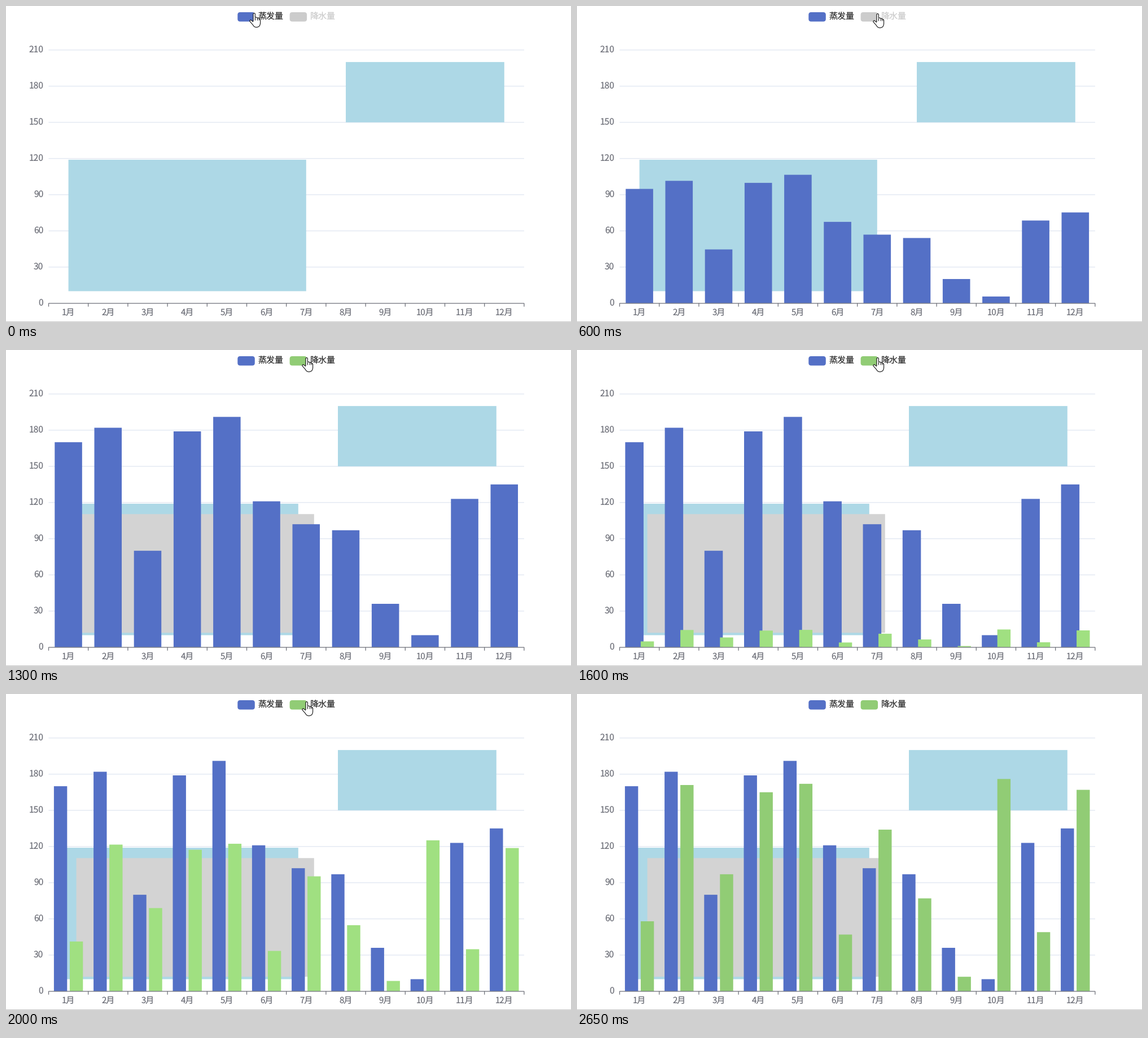
Write a matplotlib script that moves like this. It is 1001 by 559 pixels and loops after 2.94 s.

```python
import matplotlib.pyplot as plt
from matplotlib.animation import FuncAnimation
from matplotlib.patches import FancyBboxPatch, PathPatch, Rectangle
from matplotlib.path import Path
from matplotlib.transforms import Affine2D

W, H, DPI = 1001, 559, 100
LOOP, TICK = 2940, 20
PT = 72 / DPI

LEFT, BASE, BAND, UNIT = 75.5, 525.8, 70.2, 64 / 30
BLUE, BLUE_HI = "#5470c6", "#5c7bda"
GREEN, GREEN_HI = "#91cc75", "#a0e081"
OFF, AXIS, GRID = "#cccccc", "#6e7079", "#e0e6f1"

EVAPORATION = [170, 182, 80, 179, 191, 121, 102, 97, 36, 10, 123, 135]
RAINFALL = [58, 171, 97, 165, 172, 47, 134, 77, 12, 176, 49, 167]

CLICK, LEAVE, SETTLE = 1300, 2400, 2640
SHIFT = 14
SINGLE, PAIRED = (10.8, 48.6), (9.4, 23.4)

plt.rcParams["font.family"] = "Noto Sans CJK JP"
plt.rcParams["text.hinting"] = "none"
fig = plt.figure(figsize=(W / 100, H / 100), dpi=DPI, facecolor="white")
ax = fig.add_axes([0, 0, 1, 1])
ax.set(xlim=(0, W), ylim=(H, 0))
ax.axis("off")


def y_of(value):
    return BASE - value * UNIT


def clamp(p):
    return min(1.0, max(0.0, p))


def ease(p):
    """Cubic in-out."""
    p = clamp(p)
    return 4 * p**3 if p < 0.5 else 1 - 4 * (1 - p) ** 3


def line(x0, y0, x1, y1, color, z, width=1.25):
    ax.plot([x0, x1], [y0, y1], color=color, lw=width * PT, zorder=z,
            solid_capstyle="butt", snap=False)


def label(x, y, s, size, color=AXIS, ha="center"):
    return ax.text(x, y, s, fontsize=size * PT, color=color, ha=ha,
                   va="baseline", zorder=6)


def block(x, y, w, h, color, z):
    return ax.add_patch(Rectangle((x, y), w, h, fc=color, lw=0, zorder=z,
                                  snap=False))


def area(first, last, low, high, color, z):
    x0, x1 = (LEFT + BAND * (i + 0.5) for i in (first, last))
    return block(x0, y_of(high), x1 - x0, y_of(low) - y_of(high), color, z)


def bars(color, z):
    return [block(0, BASE, 0, 0, color, z) for _ in range(12)]


def place(group, values, offset, width, grow, color):
    for i, (bar, v) in enumerate(zip(group, values)):
        h = v * UNIT * grow
        bar.set_bounds(LEFT + BAND * i + offset, BASE - h, width, h)
        bar.set_facecolor(color)
        bar.set_visible(grow > 0)


def legend(x, name, color):
    key = ax.add_patch(FancyBboxPatch(
        (x, 11), 30.5, 16.5, boxstyle="round,pad=0,rounding_size=4.5",
        fc=color, lw=0, zorder=6))
    return key, label(x + 36, 24, name, 15, "#333333", "left")


def hand():
    """Pointing hand; its top left corner is at the origin."""
    M, L, C = Path.MOVETO, Path.LINETO, Path.CURVE3
    steps = [
        (M, (7, 15)), (L, (7, 2.5)), (C, (7, 0.7)), (C, (8.7, 0.7)),
        (C, (10.4, 0.7)), (C, (10.4, 2.5)), (L, (10.4, 8)),
        (C, (13.2, 7.4)), (C, (13.5, 9)), (C, (16.2, 8.4)), (C, (16.5, 10)),
        (C, (19.5, 9.7)), (C, (19.6, 12.5)), (L, (19.6, 17.5)),
        (C, (19.6, 25.6)), (C, (12.5, 25.6)), (C, (8.5, 25.6)),
        (C, (6.5, 21.5)), (L, (0.9, 15)), (C, (0.5, 12.8)), (C, (3, 12.8)),
        (L, (7, 16)),
    ]
    fingers = [p for x, y in ((10.4, 8), (13.5, 9), (16.5, 10))
               for p in ((M, (x, y)), (L, (x, 12.8)))]

    def patch(parts, **kw):
        path = Path([p for _, p in parts], [c for c, _ in parts])
        return ax.add_patch(PathPatch(path, ec="#111111", lw=1.1 * PT, **kw))

    return [patch(steps, fc="white", zorder=8),
            patch(fingers, fc="none", zorder=9)]


for k in range(8):
    y = BASE - 64 * k
    if k:
        line(LEFT, y, LEFT + 12 * BAND, y, GRID, 1)
    label(66.3, y + 4.6, str(30 * k), 15.6, ha="right")
line(LEFT, BASE + 0.2, LEFT + 12 * BAND, BASE + 0.2, AXIS, 5)
for i in range(13):
    x = LEFT + BAND * i
    line(x, BASE, x, BASE + 6, AXIS, 5)
    if i < 12:
        label(x + BAND / 2, 547, f"{i + 1}月", 15)
line(0, 558.5, W, 558.5, "#c8c8c8", 5, 1)

zones = [area(0, 6, 10, 119, "#add8e6", 2), area(7, 11, 150, 200, "#add8e6", 2)]
zone_x = [z.get_x() for z in zones]
grey = area(0, 6, 12, 110.4, "#d3d3d3", 2.5)
grey.set_x(grey.get_x() + SHIFT)

blue_bars, green_bars = bars(BLUE, 3), bars(GREEN, 4)
legend(410.3, "蒸发量", BLUE)
rain_key, rain_text = legend(502.6, "降水量", OFF)
cursor = hand()


def update(i):
    t = i * TICK
    done = t >= SETTLE
    step = LOOP if done else min(t // 100 * 100, LEAVE)
    both = step >= CLICK

    # Hand slides from the first legend entry to the second.
    slide = ease((step - 200) / 300)
    cx, cy = 431 + 93 * slide, 12 + slide
    for part in cursor:
        part.set_transform(Affine2D().translate(cx, cy) + ax.transData)
        part.set_visible(step < LEAVE)

    rise = ease(0.52 + (step - 600) * 0.00075) if step else 0
    p = 0.2755 + (step - 1600) * 0.00077 if both else 0
    squeeze = ease(2 * p)
    offset, width = (a + (b - a) * squeeze for a, b in zip(SINGLE, PAIRED))
    place(blue_bars, EVAPORATION, offset, width, rise,
          BLUE_HI if cx + 8 < 491 else BLUE)
    place(green_bars, RAINFALL, 37.4, 23.4, ease(p),
          GREEN if done else GREEN_HI)

    for zone, x in zip(zones, zone_x):
        zone.set_x(x - SHIFT * both)
    grey.set_visible(both)
    rain_key.set_facecolor(GREEN if both else OFF)
    rain_text.set_color("#333333" if both else OFF)
    return []


anim = FuncAnimation(fig, update, frames=LOOP // TICK, interval=TICK,
                     init_func=lambda: update(0), repeat=True, repeat_delay=0)
plt.show()
```
